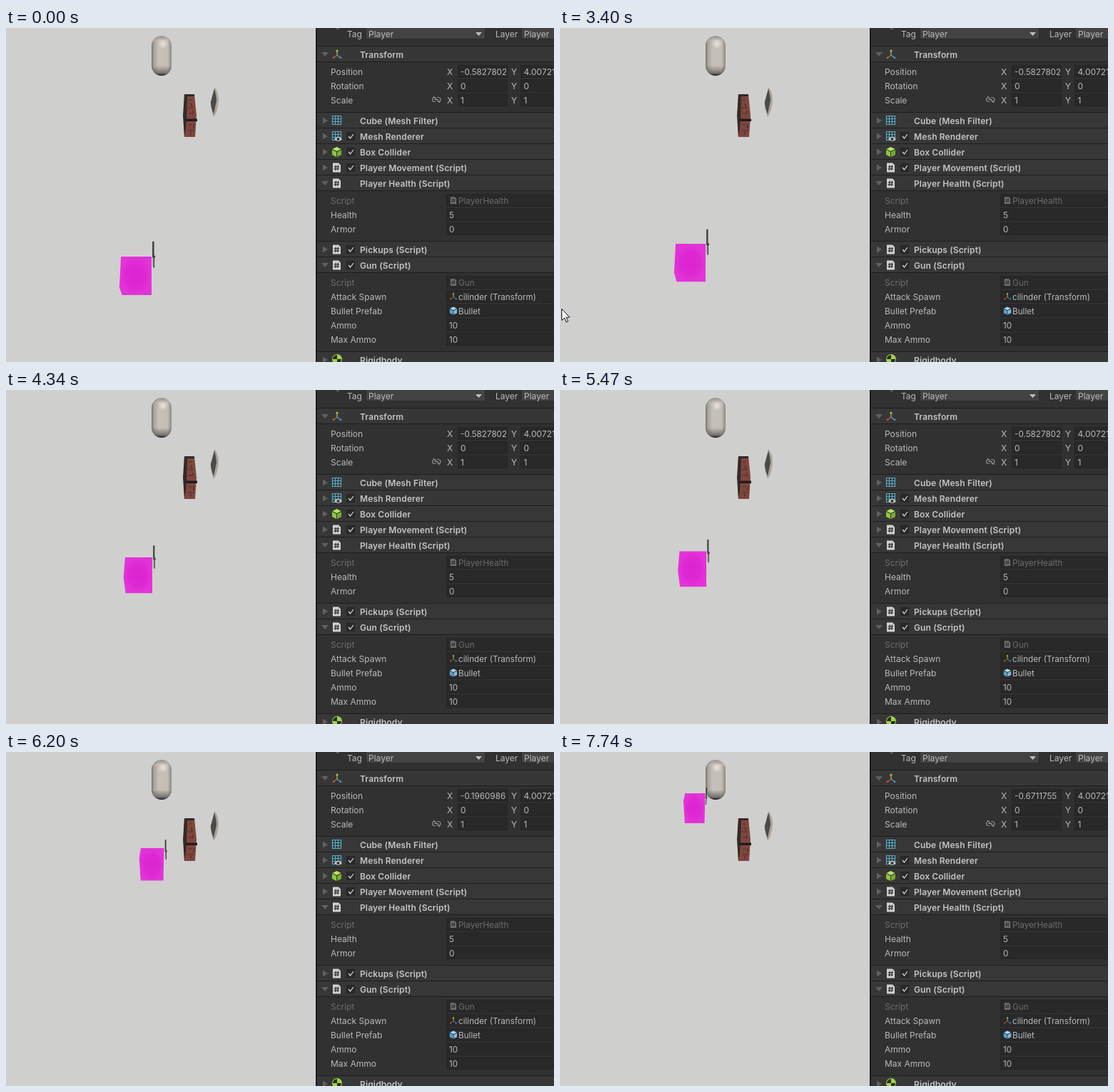
These frames come from a looping animation (768 by 469 pixels, 8000 ms). An HTML page:

```html
<!DOCTYPE html>
<html lang="en">
<head>
<meta charset="utf-8">
<title>Player inspector</title>
<style>
  html, body { margin: 0; width: 100%; height: 100%; overflow: hidden; background: #cfcfcd; }
  svg { display: block; width: 768px; height: 469px; }
  text { font: 12px Inter, "Open Sans", sans-serif; fill: #bababa; white-space: pre; }
  .title { font-weight: 600; fill: #c4c4c4; letter-spacing: .13px; }
  .value { font-size: 11.7px; }
  .dim { fill: #6c6c6c; }
  .field { fill: #292929; stroke: #252525; }
  .drop { fill: #434343; stroke: #2b2b2b; }
  .head { fill: #373737; }
  .rule { fill: #1e1e1e; }
  .fold { fill: #606060; }
  .line { fill: none; stroke-width: 1.2; }
</style>
</head>
<body>
<svg viewBox="0 0 768 469">
  <defs>
    <radialGradient id="pink">
      <stop offset="0" stop-color="#dc24d1"/>
      <stop offset=".6" stop-color="#de28d3"/>
      <stop offset="1" stop-color="#e334d8"/>
    </radialGradient>
    <linearGradient id="round">
      <stop offset="0" stop-color="#77736c"/>
      <stop offset=".12" stop-color="#a8a49c"/>
      <stop offset=".35" stop-color="#c5c1b9"/>
      <stop offset=".8" stop-color="#c3bfb7"/>
      <stop offset="1" stop-color="#8d8981"/>
    </linearGradient>
    <linearGradient id="under" x2="0" y2="1">
      <stop offset="0" stop-color="#3c3a36" stop-opacity=".35"/>
      <stop offset=".12" stop-color="#3c3a36" stop-opacity="0"/>
      <stop offset=".75" stop-color="#2a2825" stop-opacity="0"/>
      <stop offset=".93" stop-color="#2a2825" stop-opacity=".5"/>
      <stop offset="1" stop-color="#0c0b0a" stop-opacity=".95"/>
    </linearGradient>
    <radialGradient id="shine">
      <stop offset="0" stop-color="#e9e6df"/>
      <stop offset="1" stop-color="#e9e6df" stop-opacity="0"/>
    </radialGradient>
    <clipPath id="xClip"><rect x="635" y="50" width="66" height="22"/></clipPath>
  </defs>

  <rect width="768" height="469" fill="#cfcfcd"/>

  <g id="capsule">
    <rect x="204" y="11" width="28" height="56" rx="14" fill="url(#round)"/>
    <rect x="204" y="11" width="28" height="56" rx="14" fill="url(#under)"/>
    <circle cx="220" cy="22" r="7" fill="url(#shine)"/>
  </g>

  <g id="bricks">
    <path d="M250 93H264L267 123L265 153H250L249 123Z" fill="#7f463d"/>
    <path d="M250 93H264V96H254L253 127L252 142L250 153L248 123Z" fill="#332a28"/>
    <path d="M252 127.500H268V131H252Z" fill="#221d1c"/>
    <path class="line" d="M256 101h4M259 106l2 5M255 112h7M262 116v5M256 120h5M256 136h4M263 135v6M255 144h9M259 146v4" stroke="#432f2b"/>
  </g>

  <g id="shield">
    <path d="M292.500 83Q298 91 298 101Q297 117 291 125Q287 114 286.500 104Z" fill="#aaa59b"/>
    <path d="M292 85Q295 96 295 102L291 121Q287 111 287 104Z" fill="#4c4a46"/>
  </g>

  <polygon id="cube" fill="url(#pink)"/>
  <g id="gun">
    <path d="M-.5 0H2V20H3.500V23H2.500V37H1V23H-.5Z" fill="#40413f"/>
    <path d="M0 22H1V35H0Z" fill="#777975"/>
  </g>
  <path id="cursor" d="M2.500 394.500V410.500L6.300 407L8.800 413L11.300 412L8.800 406.200H13.500Z" fill="#fff" stroke="#111"/>

  <g id="panel"></g>
</svg>

<script>
const $ = id => document.getElementById(id);

/* Inspector panel */
const text = (x, y, s, cls = '') => `<text x="${x}" y="${y + 4.6}" class="${cls}">${s}</text>`;
const rect = (x, y, w, h, cls) => `<rect x="${x}" y="${y}" width="${w}" height="${h}" class="${cls}"/>`;
const path = (d, fill) => `<path d="${d}" fill="${fill}"/>`;
const line = (d, color) => `<path class="line" d="${d}" stroke="${color}"/>`;

const fold = (y, open) => `<path class="fold" d="${open
  ? `M442 ${y - 3}h10l-5 6z` : `M444 ${y - 4.5}v9l7 -4.5z`}"/>`;

const check = y => rect(477.5, y - 5.5, 11, 11, 'field') +
  line(`M480 ${y}l2.5 3l4.5 -6`, '#dcdcdc');

const page = (x, y, k, color) => `<g transform="translate(${x} ${y}) scale(${k})">` +
  path('M-5.5 -6.5H2.5L5.5 -3.5V6.5H-5.5Z', color) +
  line('M-1.2 -3.5L-2 4M2 -3.5L1.2 4M-3.8 -1.2H3.6M-4 1.8H3.4', '#303030') + '</g>';

const axes = (x, y, k) => `<g transform="translate(${x} ${y}) scale(${k})">` +
  line('M0 1V-5', '#b9c93c') + line('M0 1L-5 5', '#d8573c') + line('M0 1L5 5', '#4b9fd8') +
  path('M-2 -4L0 -7L2 -4Z', '#b9c93c') + path('M-6.5 6L-5.5 2.8L-3.4 5.6Z', '#d8573c') +
  path('M6.5 6L5.5 2.8L3.4 5.6Z', '#4b9fd8') + '</g>';

const box = (x, y, k, colors) => `<g transform="translate(${x} ${y}) scale(${k})">` +
  path('M0 -7L6 -4L0 -1L-6 -4Z', colors[0]) + path('M-6.5 -3L-.5 0V7L-6.5 4Z', colors[1]) +
  path('M6.5 -3L.5 0V7L6.5 4Z', colors[2]) + '</g>';

const grid = y => line(`M457.5 ${y - 6.5}h12v12h-12zM461.5 ${y - 6.5}v12M465.5 ${y - 6.5}v12` +
  `M457.5 ${y - 2.5}h12M457.5 ${y + 1.5}h12`, '#58a9c4');

const eye = y => path(`M460 ${y + 4}q5.5 -7 11 0q-5.5 6 -11 0z`, '#c4c4c4') +
  `<circle cx="465.5" cy="${y + 4}" r="2" fill="#333"/>`;

const ball = y => `<circle cx="464" cy="${y - 1}" r="7" fill="#a4cf4c"/>` +
  path(`M464 ${y - 1}v-6a6 6 0 0 0 -6 6zv6a6 6 0 0 0 6 -6z`, '#263016');

const icons = {
  axes: y => axes(464, y, 1),
  grid,
  mesh: y => grid(y) + eye(y),
  box: y => box(463.5, y, 1, ['#b4e563', '#8cc63e', '#75ad2f']),
  script: y => page(463.5, y, 1, '#d2d2d2'),
  ball
};

const header = ([y, name, icon, open, checked]) =>
  rect(436, y - 11, 332, 22, 'head') + rect(436, y - 12, 332, 1, 'rule') +
  rect(436, y + 10, 332, 1, 'rule') +
  fold(y, open) + icons[icon](y) + (checked ? check(y) : '') + text(496, y, name, 'title');

const row = ([y, name, value, icon = '', cls = '']) =>
  text(455, y, name, cls) + rect(617.5, y - 8.5, 160, 17, 'field') +
  icon + text(icon ? 634 : 621, y, value, 'value ' + cls);

const vector = (y, name, x, v) =>
  text(455, y, name) + text(618, y, 'X') + text(708, y, 'Y') +
  rect(633.5, y - 8.5, 69, 17, 'field') + rect(721.5, y - 8.5, 60, 17, 'field') +
  text(637, y, x) + text(725.5, y, v);

const headers = [
  [37, 'Transform', 'axes', true],
  [130, 'Cube (Mesh Filter)', 'grid'],
  [152, 'Mesh Renderer', 'mesh', false, true],
  [174, 'Box Collider', 'box', false, true],
  [196, 'Player Movement (Script)', 'script', false, true],
  [218, 'Player Health (Script)', 'script', true],
  [311, 'Pickups (Script)', 'script', false, true],
  [333, 'Gun (Script)', 'script', true, true],
  [466, 'Rigidbody', 'ball', false]
];

const rows = [
  [242, 'Script', 'PlayerHealth', page(627, 242, .75, '#6f6f6f'), 'dim'],
  [262, 'Health', '5'],
  [282, 'Armor', '0'],
  [357, 'Script', 'Gun', page(627, 357, .75, '#6f6f6f'), 'dim'],
  [377, 'Attack Spawn', 'cilinder (Transform)', axes(627, 377, .75)],
  [397, 'Bullet Prefab', 'Bullet', box(627, 397, .8, ['#a9d4f2', '#5f9fcb', '#7fb9e0'])],
  [417, 'Ammo', '10'],
  [437, 'Max Ammo', '10']
];

$('panel').innerHTML =
  '<rect x="434" width="334" height="469" fill="#313131"/>' + rect(434, 0, 2, 469, 'rule') +
  line('M463 0q1 2 4 1', '#777') +
  text(478, 8, 'Tag') + rect(504.5, -2.5, 167, 18, 'drop') + text(508, 8, 'Player') +
  path('M658 6h9l-4.5 5z', '#c0c0c0') +
  text(686, 8, 'Layer') + rect(722.5, -2.5, 60, 18, 'drop') + text(726, 8, 'Player') +
  headers.map(header).join('') +
  vector(61, 'Position', '', '4.00721') + vector(81, 'Rotation', '0', '0') +
  vector(101, 'Scale', '1', '1') +
  '<g clip-path="url(#xClip)"><text id="posX" class="value" x="637" y="65.6"></text></g>' +
  line('M602 97.5h-1.5a3 3 0 0 0 0 6h2M604 97.5h2a3 3 0 0 1 0 6h-1M600 100.5h6M599 96l9 9', '#8c8c8c') +
  rows.map(row).join('');

/* Motion: the picture advances 15 times a second, 120 ticks per loop */
const topKeys = [[45, 321], [48, 316.5], [51, 303], [55, 262], [61, 262], [65, 235], [81, 235],
  [87, 184], [93, 135], [94, 130], [98, 130], [111, 58]];
const rightKeys = [[45, 204], [51, 204], [65, 205], [81, 205], [87, 205.5], [93, 221.5],
  [94, 222], [98, 222], [111, 220.3], [116, 203.5]];
const posKeys = [[87, -.5827802], [93, -.1960986], [96, -.1787432], [111, -.1787432], [116, -.6711755]];

function at(keys, k) {
  const i = keys.findIndex(key => key[0] >= k);
  if (i < 0) return keys[keys.length - 1][1];
  if (i === 0) return keys[0][1];
  const [k0, v0] = keys[i - 1], [k1, v1] = keys[i];
  return v0 + (v1 - v0) * (k - k0) / (k1 - k0);
}

function draw(k) {
  const top = at(topKeys, k), right = at(rightKeys, k), far = top - 58;
  const left = right - 30.5 - far * .0555, height = 42 + far * .046;
  const low = Math.max(.25, Math.min(.8, .3 + (top - 135) * .0027));
  $('cube').setAttribute('points', [
    [left + 2.2, top], [right, top], [right - (top < 180 ? 1 : 0), top + height],
    [left + 1 + 3.4 * low, top + height], [left, top + height * low]
  ].join(' '));

  const size = (24 + far * .049) / 37;
  $('gun').setAttribute('transform',
    `translate(${right + 1.6} ${top - 8 - far * .05}) scale(${size}) rotate(${top < 100 ? 4 : 0})`);

  $('cursor').setAttribute('visibility', k >= 50 && k < 62 ? 'visible' : 'hidden');
  $('cursor').setAttribute('transform', `translate(${k < 51 ? -2 : 0} 0)`);
  $('posX').textContent = at(posKeys, k).toFixed(7);
}

const start = performance.now();
function frame() {
  const t = (performance.now() - start) % 8000;
  draw(Math.floor(t * .015 + .1) % 120);
  requestAnimationFrame(frame);
}
frame();
</script>
</body>
</html>
```
